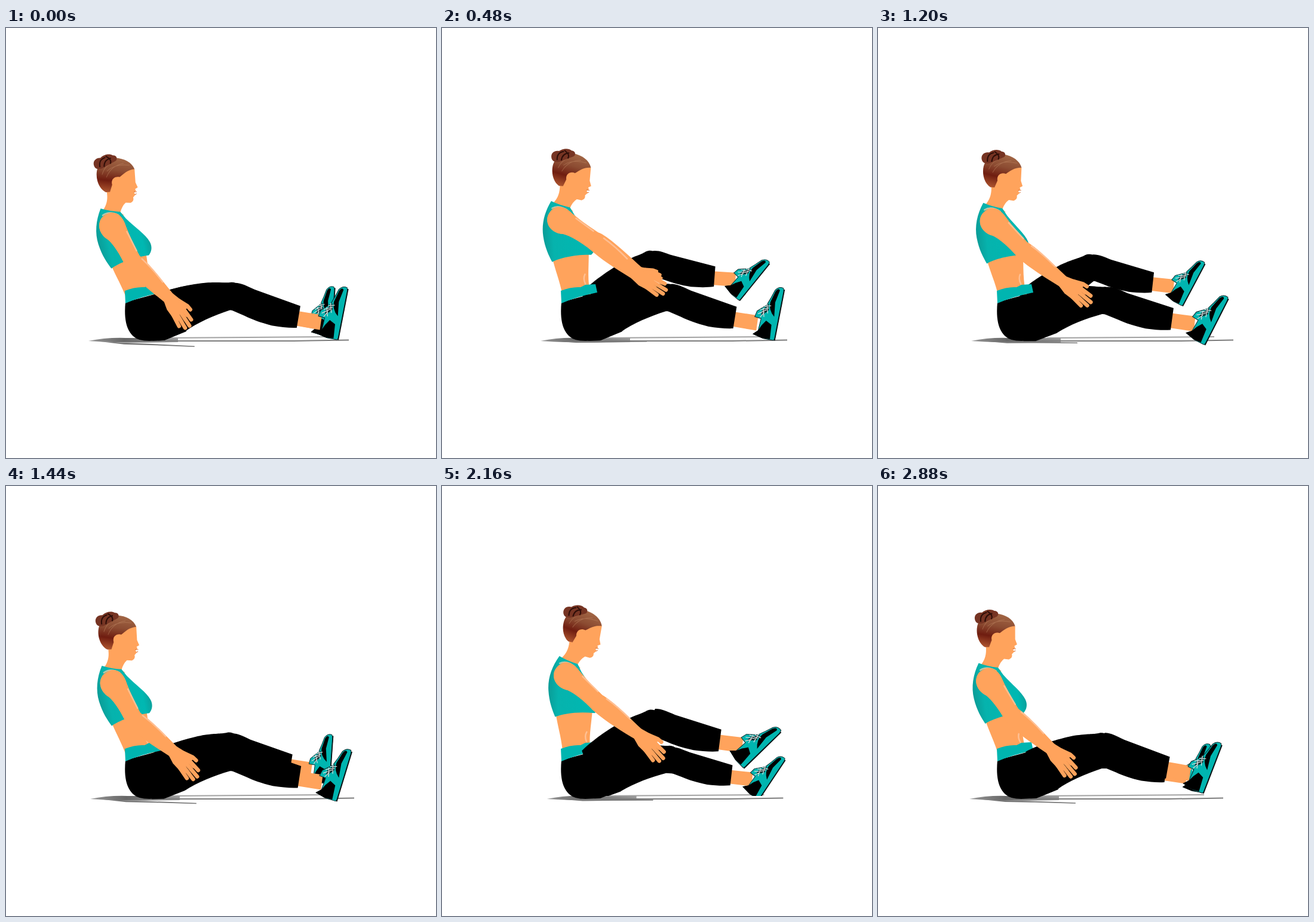
An HTML page without scripts for the animation above (3 s loop, 720 by 720 pixels).

```html
<!DOCTYPE html>
<html lang="en">
<head>
<meta charset="utf-8">
<title>Seated leg raise</title>
<style>
/* lean, upper arm, forearm, hand, far arm offset */
@property --b { syntax: "<angle>"; inherits: true; initial-value: 0deg }
@property --a { syntax: "<angle>"; inherits: true; initial-value: 0deg }
@property --e { syntax: "<angle>"; inherits: true; initial-value: 0deg }
@property --h { syntax: "<angle>"; inherits: true; initial-value: 0deg }
@property --o { syntax: "<angle>"; inherits: true; initial-value: 0deg }
/* thigh, shin, foot: near leg, then far leg */
@property --t1 { syntax: "<angle>"; inherits: true; initial-value: 0deg }
@property --s1 { syntax: "<angle>"; inherits: true; initial-value: 0deg }
@property --f1 { syntax: "<angle>"; inherits: true; initial-value: 0deg }
@property --t2 { syntax: "<angle>"; inherits: true; initial-value: 0deg }
@property --s2 { syntax: "<angle>"; inherits: true; initial-value: 0deg }
@property --f2 { syntax: "<angle>"; inherits: true; initial-value: 0deg }
/* shadow: left end, right end, hand streak */
@property --w { syntax: "<length>"; inherits: true; initial-value: 0px }
@property --q { syntax: "<length>"; inherits: true; initial-value: 0px }
@property --k { syntax: "<angle>"; inherits: true; initial-value: 0deg }

html, body { margin: 0; width: 100%; height: 100%; overflow: hidden; background: #fff }
svg { display: block; width: 100vw; height: 100vh; animation: pose 3s steps(3) infinite }

@keyframes pose {
  0%, 100% {
    --b: -11.8deg; --a: 60deg; --e: 45deg; --h: 57deg; --o: 0deg;
    --t1: -14.2deg; --s1: 17.3deg; --f1: -79deg;
    --t2: -14.5deg; --s2: 18.5deg; --f2: -86deg;
    --w: 138px; --q: 572px; --k: 2.7deg;
    animation-timing-function: steps(4);
  }
  16% {
    --b: -2.6deg; --a: 33deg; --e: 38deg; --h: 31deg; --o: -2deg;
    --t1: -13.5deg; --s1: 17deg; --f1: -79deg;
    --t2: -38deg; --s2: 12deg; --f2: -51deg;
    --w: 165px; --q: 576px; --k: 0deg;
    animation-timing-function: steps(2);
  }
  24% {
    --b: .8deg; --a: 28deg; --e: 36deg; --h: 29deg; --o: -5deg;
    --t1: -12deg; --s1: 16deg; --f1: -72deg;
    --t2: -51deg; --s2: 11deg; --f2: -38deg;
    --w: 174px; --q: 582px; --k: 0deg;
    animation-timing-function: steps(1);
  }
  32% {
    --b: -.3deg; --a: 29deg; --e: 36deg; --h: 29deg; --o: -5deg;
    --t1: -11.3deg; --s1: 14.8deg; --f1: -70deg;
    --t2: -48.8deg; --s2: 11.2deg; --f2: -40deg;
    --w: 171px; --q: 585px; --k: 0deg;
    animation-timing-function: steps(2);
  }
  40% {
    --b: -5deg; --a: 44deg; --e: 38deg; --h: 40deg; --o: 0deg;
    --t1: -11.5deg; --s1: 15.5deg; --f1: -63deg;
    --t2: -35deg; --s2: 14deg; --f2: -62deg;
    --w: 156px; --q: 593px; --k: .8deg;
    animation-timing-function: steps(2);
  }
  48% {
    --b: -11deg; --a: 60deg; --e: 39deg; --h: 50deg; --o: 0deg;
    --t1: -12.3deg; --s1: 16.6deg; --f1: -73deg;
    --t2: -19.9deg; --s2: 17deg; --f2: -86deg;
    --w: 141px; --q: 581px; --k: 2.2deg;
    animation-timing-function: steps(1);
  }
  52% {
    --b: -11.8deg; --a: 60deg; --e: 42deg; --h: 53deg; --o: 0deg;
    --t1: -13.5deg; --s1: 17deg; --f1: -77deg;
    --t2: -15deg; --s2: 17deg; --f2: -82deg;
    --w: 138px; --q: 577px; --k: 2.6deg;
  }
  64% {
    --b: -3.6deg; --a: 50deg; --e: 40.6deg; --h: 47deg; --o: 0deg;
    --t1: -30.2deg; --s1: 17.5deg; --f1: -60.8deg;
    --t2: -6.9deg; --s2: 11deg; --f2: -49deg;
    --w: 163px; --q: 570px; --k: 1.2deg;
  }
  76% {
    --b: 5.3deg; --a: 37deg; --e: 36deg; --h: 48deg; --o: 0deg;
    --t1: -40.5deg; --s1: 14deg; --f1: -36deg;
    --t2: -12.8deg; --s2: 16deg; --f2: -60deg;
    --w: 182px; --q: 569px; --k: 0deg;
    animation-timing-function: steps(1);
  }
  84% {
    --b: 4.2deg; --a: 38.7deg; --e: 36.5deg; --h: 50deg; --o: 0deg;
    --t1: -39deg; --s1: 15deg; --f1: -38deg;
    --t2: -12.5deg; --s2: 15.7deg; --f2: -58deg;
    --w: 178px; --q: 570px; --k: 0deg;
  }
  96% {
    --b: -7.9deg; --a: 56deg; --e: 40.5deg; --h: 50deg; --o: 0deg;
    --t1: -19.6deg; --s1: 18deg; --f1: -69deg;
    --t2: -14deg; --s2: 16deg; --f2: -80deg;
    --w: 153px; --q: 576px; --k: 2deg;
    animation-timing-function: steps(1);
  }
}

.near { --t: var(--t1); --s: var(--s1); --f: var(--f1); --z: 1 }
.far { --t: var(--t2); --s: var(--s2); --f: var(--f2); --z: .92 }
.thigh { transform: translate(236px, 487px) rotate(var(--t)) }
.shin { transform: translate(150px, 0) rotate(calc(var(--s) - var(--t))) scale(var(--z)) }
.foot { transform: translate(150px, -10px) rotate(calc(var(--f) - var(--s))) }

.lean { transform: translate(248px, 447px) rotate(var(--b)) translate(-248px, -447px) }
.arm { transform: translate(203px, 318px) rotate(calc(var(--a) - var(--b))) }
.arm.back { transform: translate(203px, 318px) rotate(calc(var(--a) - var(--b) + var(--o))) }
.fore { transform: translate(72px, 0) rotate(calc(var(--e) - var(--a))) }
.hand { transform: translate(85px, 0) rotate(calc(var(--h) - var(--e))) }

.left { transform: translate(var(--w), 523px) }
.right { transform: translate(var(--q), 522px) }
.streak { transform: translate(var(--w), 523px) rotate(var(--k)) }

.skin { fill: #ffa35c }
.teal { fill: #00b5b0 }
.glow { fill: none; stroke: #ffc9a6; stroke-width: 2.5; stroke-linecap: round; opacity: .75 }
</style>
</head>
<body>
<svg viewBox="0 0 720 720">
  <defs>
    <linearGradient id="hair" x1=".7" y1="0" x2=".3" y2="1">
      <stop offset="0" stop-color="#a56a48"/>
      <stop offset=".4" stop-color="#8c4c32"/>
      <stop offset=".7" stop-color="#6f1d10"/>
      <stop offset="1" stop-color="#a8502c"/>
    </linearGradient>
    <linearGradient id="top">
      <stop offset="0" stop-color="#0a9c97"/>
      <stop offset=".2" stop-color="#06b3ad"/>
      <stop offset=".85" stop-color="#00b8b2"/>
      <stop offset="1" stop-color="#0aa19c"/>
    </linearGradient>
    <linearGradient id="shade">
      <stop offset="0" stop-color="#999"/>
      <stop offset=".4" stop-color="#666"/>
      <stop offset="1" stop-color="#999"/>
    </linearGradient>
    <clipPath id="floor"><path d="M0 0H720V519H0Z"/></clipPath>

    <path id="thigh" d="M25-36C50-40 95-37 115-33S142-25 152-24C162-22 168-12 166 0L150 23 138 20C110 22 80 27 57 36L20 42 0 38Z"/>
    <g id="shin">
      <path class="skin" d="M108-9L150-15 154 10 108 16Z"/>
      <path d="M-5-23C5-26 15-24 30-22L111-18.5 116 18C105 22 90 25 75 27 55 28 40 27 27 25L0 22-12 16Z"/>
    </g>
    <g id="shoe">
      <path class="teal" stroke="#0b2a2c" d="M-31 33L-31 16-27-2-20 5 1 6 2-5 12-3 25 11 39 16 52 20Q60 25 58 33L52 35H-28Z"/>
      <path d="M-30 27L-31 14-27-3-19 5-10 9-1 15-6 25Z"/>
      <path d="M8 27Q18 15 31 16L50 21Q58 25 53 28L32 24Z"/>
      <path d="M5 5L14 5 28 14 17 16Z" fill="#0b2a2c"/>
      <path d="M-31 35H56" fill="none" stroke="#061416" stroke-width="2"/>
      <path d="M3 4L12 9M8 0L17 12M15 2L21 15M22 8L25 18M5 10L19 6M12 15L27 11" fill="none" stroke="#d8dedd" stroke-width="1.3" stroke-linecap="round"/>
    </g>

    <path id="upper" class="skin" d="M-20-4C-18-18-4-22 8-20 24-17 45-15 72-14L72 15C50 13 30 14 18 18 8 24-6 24-14 16-20 10-21 4-20-4Z"/>
    <path id="fore" class="skin" d="M0-15C25-17 55-12 88-9L88 10C60 13 30 17 0 15A15 15 0 0 1 0-15Z"/>
    <g id="hand">
      <path class="skin" d="M-4-9L14-15 31-13 33 13 14 14-4 10Z"/>
      <path d="M12-11L27-18 35-19M28-10L50-11M30-3L57-3M29 4L56 5M27 10L48 12" fill="none" stroke="#ffa35c" stroke-width="6.6" stroke-linecap="round" stroke-linejoin="round"/>
    </g>
  </defs>

  <path class="left" fill="url(#shade)" d="M0 1Q30-5 62-4H150V3Q60 5 0 1Z"/>
  <path class="right" fill="none" stroke="#a2a2a2" stroke-width="2" d="M-310-3L-30-5"/>
  <path class="right" fill="none" stroke="#7c7c7c" stroke-width="2" d="M-335 2L-90 2 2 .5"/>
  <path class="streak" fill="#777" d="M20 1L178 1 178 2.5 110 3 60 4Z"/>

  <g class="far" clip-path="url(#floor)">
    <g class="thigh">
      <use href="#thigh"/>
      <g class="shin">
        <use href="#shin"/>
        <g class="foot"><use href="#shoe"/></g>
      </g>
    </g>
  </g>

  <g class="lean">
    <path class="skin" d="M188 384C192 405 198 420 202 446L249 446C244 425 248 400 249 376Z"/>
    <path class="glow" d="M241 412Q237 419 241 428" opacity=".5"/>
    <path class="skin" d="M206 255C206 272 203 281 193 291L208 305 226 306 221 300Q226 290 233 286L241 288Q248 286 247 280L252 276 250 273 254 270 253 267 258 265 256 256 259 234 240 222 215 235Z"/>
    <path d="M250 271L255 272M251 276L254 275" fill="none" stroke="#d9763f" stroke-width="1"/>
    <path fill="url(#hair)" d="M204 262C194 254 192 238 196 226 201 212 216 206 231 209 246 213 257 222 259 234 246 233 240 238 232 242 224 238 216 243 217 252L211 263Z"/>
    <path d="M204 232Q211 218 228 214M210 238Q222 220 243 221M213 228Q229 218 252 226" fill="none" stroke="#c08a66" stroke-width="1" opacity=".45"/>
    <path fill="#763423" d="M194 216C192 207 199 202 207 204 214 199 224 200 228 204 235 205 235 212 231 214L206 222Q196 223 194 216Z"/>
    <path d="M203 219Q203 206 215 205M210 220Q212 208 224 208M216 203Q226 211 221 217" fill="none" stroke="#2e0e08" stroke-width="2"/>
    <path fill="url(#top)" d="M190 287C178 305 172 325 174 345 176 365 182 378 187 389 200 383 225 378 253 380 259 375 262 367 259 358 255 345 240 330 228 312L221 299Q205 295 190 287Z"/>
    <path class="glow" d="M191 299Q203 293 217 304" stroke-width="4"/>
  </g>

  <path d="M200 459C198 480 199 503 213 516Q221 524 240 524L265 523 302 508 290 442 252 445Z"/>
  <path class="teal" d="M199 440Q216 433 232 434L240 430 257 429 260 443Q228 449 200 461Z"/>

  <g class="near">
    <g class="thigh">
      <use href="#thigh"/>
      <g class="shin">
        <use href="#shin"/>
        <g class="foot"><use href="#shoe"/></g>
      </g>
    </g>
  </g>

  <g class="lean">
    <g class="arm back">
      <use href="#upper"/>
      <g class="fore">
        <use href="#fore"/>
        <g class="hand"><use href="#hand" transform="scale(.8)"/></g>
      </g>
    </g>
    <g class="arm">
      <use href="#upper"/>
      <path class="glow" d="M22-16L58-14"/>
      <g class="fore">
        <use href="#fore"/>
        <path class="glow" d="M6-14Q30-15 58-11"/>
        <g class="hand"><use href="#hand"/></g>
      </g>
    </g>
  </g>
</svg>
</body>
</html>
```
